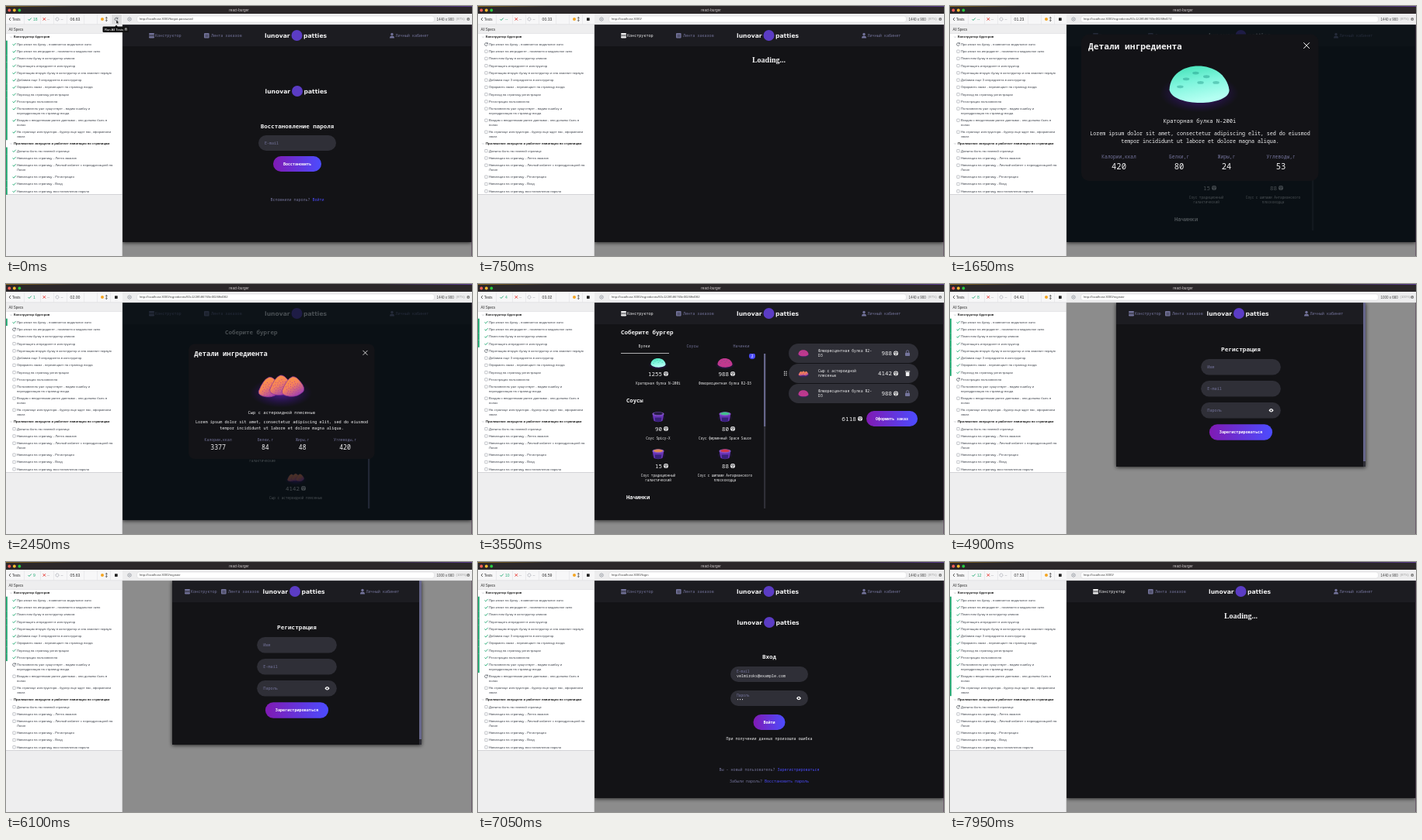
An HTML page that plays this animation: 600x323 px, repeating every 8 s.

```html
<!DOCTYPE html>
<html lang="ru">
<head>
<meta charset="utf-8">
<title>react-burger</title>
<style>
html, body { margin: 0; width: 100%; height: 100%; overflow: hidden; background: #8c8c8c; }
svg { display: block; width: 100vw; height: 100vh; }
text { white-space: pre; }
.ui { font-family: "Liberation Sans", Arial, sans-serif; }
.mono { font-family: "Noto Sans Mono", "DejaVu Sans Mono", monospace; font-weight: 500; }
.wide { font-family: "DejaVu Sans", sans-serif; font-weight: bold; }
.serif { font-family: "Liberation Serif", Times, serif; font-weight: bold; }
.b { font-weight: bold; }
.m { font-weight: 600; }
</style>
</head>
<body>
<svg viewBox="0 0 600 323">
  <defs>
    <linearGradient id="btn"><stop stop-color="#801ab3"/><stop offset="1" stop-color="#4c4cff"/></linearGradient>
    <linearGradient id="desk"><stop stop-color="#8a6a20"/><stop offset=".15" stop-color="#2b2729"/><stop offset=".8" stop-color="#2b2729"/><stop offset="1" stop-color="#5a3a90"/></linearGradient>
    <linearGradient id="aqua" x2=".3" y2="1"><stop stop-color="#3fe0b4"/><stop offset=".5" stop-color="#7df5dc"/><stop offset="1" stop-color="#b4fff2"/></linearGradient>
    <linearGradient id="cheese" x2=".7" y2="1"><stop stop-color="#ff9a3c"/><stop offset=".5" stop-color="#f5835a"/><stop offset="1" stop-color="#9a3fb8"/></linearGradient>
    <radialGradient id="glow"><stop stop-color="#6a22c8" stop-opacity=".75"/><stop offset="1" stop-color="#3a1290" stop-opacity="0"/></radialGradient>
    <clipPath id="list"><rect x="180" y="90" width="192" height="200"/></clipPath>
    <filter id="soft" x="-10%" y="-10%" width="120%" height="120%"><feGaussianBlur stdDeviation="2.5"/></filter>
  </defs>
  <g id="stage"></g>
</svg>
<script>
const LOOP = 8000, STEP = 50;
const WHITE = '#f2f2f3', MUTED = '#74749c', LINK = '#4c4cff', PILL = '#2f2f37', GREEN = '#1fa971', GREY = '#8a8f98';
const HOST = 'http://localhost:3000/', ITEM = 'ingredients/60c1228586769e0026ffd0';

const SUITES = [
  ['Конструктор бургеров', [
    'При клике на булку - появляется модальное окно',
    'При клике на ингридиент - появляется модальное окно',
    'Поместим булку в конструктор кликом',
    'Перетащить ингредиент в конструктор',
    'Перетащим вторую булку в конструктор и она заменит первую',
    'Добавим еще 3 ингредиента в конструктор',
    'Оформить заказ - перемещает на страницу входа',
    'Переход на страницу регистрации',
    'Регистрация пользователя',
    'Пользователь уже существует - видим ошибку и|переадрисация на страницу входа',
    'Входим с введенными ранее данными - они должны быть в|полях',
    'На странице конструктора - бургер еще ждет нас, оформляем|заказ']],
  ['Приложение запущено и работает навигация по страницам', [
    'Должны быть на главной странице',
    'Навигация на страницу - Лента заказов',
    'Навигация на страницу - Личный кабинет с переадресацией на|Логин',
    'Навигация на страницу - Регистрация',
    'Навигация на страницу - Вход',
    'Навигация на страницу восстановления пароля']]
];
const PASSED_AT = [1750, 2600, 2950, 3350, 3700, 4100, 4450, 4800, 6030, 6850, 7300, 7800];
const CLOCK = [[420, 0], [1650, 1230], [2450, 2000], [3550, 3020], [4900, 4410], [7050, 6590], [7950, 7530], [8000, 7580]];

const clamp = v => Math.max(0, Math.min(1, v));
const ramp = (t, a, b) => clamp((t - a) / (b - a));
const easeOut = p => 1 - (1 - p) ** 3;
const typed = (s, t, a, b) => s.slice(0, Math.round(s.length * ramp(t, a, b)));

// y is the vertical middle of the line
const text = (x, y, s, size, fill, cls = 'mono', anchor = 'start') =>
  `<text x="${x}" y="${y + size * .35}" font-size="${size}" fill="${fill}" class="${cls}" text-anchor="${anchor}">${s}</text>`;
const mid = (x, y, s, size, fill, cls) => text(x, y, s, size, fill, cls, 'middle');
const lines = (x, y, s, size, fill, gap, fn = mid, cls = 'mono') =>
  s.split('|').map((l, i) => fn(x, y + i * gap, l, size, fill, cls)).join('');
const rect = (x, y, w, h, fill, r = 0, more = '') =>
  `<rect x="${x}" y="${y}" width="${w}" height="${h}" rx="${r}" fill="${fill}" ${more}/>`;
const dot = (x, y, r, fill) => `<circle cx="${x}" cy="${y}" r="${r}" fill="${fill}"/>`;
const line = (d, color, w = .7) => `<path d="${d}" fill="none" stroke="${color}" stroke-width="${w}"/>`;
const group = (transform, body) => `<g transform="${transform}">${body}</g>`;

const check = (x, y) => line(`M${x - 2} ${y}l1.4 1.5 2.8-3`, GREEN, .9);
const spin = (x, y) => line(`M${x + 1.7} ${y - .8}a1.9 1.9 0 1 0 .1 1.6M${x + 1.9} ${y - 2.2}v1.6h-1.6`, '#444b55', .7);

const COLORS = {
  aqua: 'url(#aqua)', pink: '#c0388f', cheese: 'url(#cheese)', meat: '#c25a63',
  black: '#251a45', green: '#40c08a', orange: '#e08a50', red: '#d0364a'
};

function cup(color) {
  return '<path d="M-.5-.22L-.36 .4Q0 .55 .36 .4L.5-.22Z" fill="#6a35b8"/><path d="M-.3 .1l.05 .32Q0 .5 .25 .42L.3 .1Z" fill="#38207a"/>' +
    `<ellipse cy="-.22" rx=".5" ry=".17" fill="#8a5ad0"/><ellipse cy="-.24" rx=".4" ry=".12" fill="${color}"/>`;
}

function bun(color) {
  const marks = [[-.22, -.1], [-.06, -.2], [.12, -.14], [.28, -.04], [.02, -.04], [-.32, .03]];
  return `<path d="M-.5 .08C-.48-.44 .42-.46 .5 .08C.52 .36-.44 .38-.5 .08Z" fill="${color}"/>` +
    marks.map(([x, y]) => `<ellipse cx="${x}" cy="${y}" rx=".055" ry=".025" fill="#0a7a70" opacity=".35"/>`).join('');
}

function slices(color) {
  const slice = (x, y, i) => group(`translate(${x} ${y})`,
    `<path d="M-.2 .08Q-.1-.18 .02-.22Q.1-.24 .2-.1Q.3 .02 .25 .1Q.12 .22-.04 .2Q-.22 .18-.2 .08Z" fill="${color}" stroke="#8a2f9a" stroke-width=".012"/>` +
    Array.from({ length: 36 }, (_, k) => {
      const a = k * 2.4 + i, r = Math.sqrt(k / 36) * .17;
      return rect(.03 + Math.cos(a) * r, .03 + Math.sin(a) * r, .014, .014, '#b02fa8');
    }).join(''));
  return [[-.28, .03], [-.04, -.01], [.22, .02]].map(([x, y], i) => slice(x, y, i)).join('');
}

function food(kind, x, y, w) {
  const shape = { aqua: bun, pink: bun, cheese: slices, meat: slices }[kind] || cup;
  return group(`translate(${x} ${y}) scale(${w})`,
    '<ellipse cy=".14" rx=".66" ry=".32" fill="url(#glow)"/>' + shape(COLORS[kind]));
}

const gem = (x, y) => dot(x, y, 3, WHITE) +
  line(`M${x - 2.4} ${y - .8}h4.8M${x} ${y + 2.6}l-1.4-3.3 1.4-1.7 1.4 1.7Z`, '#1c1c21', .5);
const price = (x, y, n, size = 7.5) => text(x, y, n, size, WHITE, 'mono', 'end') + gem(x + 5, y);
const button = (y, w, label, x = 375, h = 20) =>
  rect(x - w / 2, y, w, h, 'url(#btn)', h / 2) + mid(x, y + h / 2, label, 5, '#fff', 'mono m');
const eye = (x, y) => `<path d="M${x - 3} ${y}Q${x} ${y - 4.4} ${x + 3} ${y}Q${x} ${y + 4.4} ${x - 3} ${y}Z" fill="#fff"/>` + dot(x, y, 1.1, PILL);
const field = (y, label, value = '', secret = false) => rect(325, y, 100, 20, PILL, 10) +
  (value ? text(333, y + 6.3, label, 4.6, MUTED) + text(333, y + 12.3, value, 5, WHITE) : text(333, y + 10, label, 5, MUTED)) +
  (secret ? eye(413, y + 10) : '');
const hint = (y, ask, link) => mid(375, y, `<tspan fill="${MUTED}">${ask} </tspan>${link}`, 5, LINK);

const logo = (x, y) => text(x - 9, y, 'lunovar', 7.6, WHITE, 'wide', 'end') + dot(x, y, 7, '#5b3cc4') +
  text(x + 8.5, y, 'patties', 7.6, WHITE, 'wide');

function header(x1, x2, x3, cx, active) {
  const c = active ? WHITE : MUTED;
  return rect(x1 - 6, 35, 7, 2, c, 1) + rect(x1 - 6, 37.6, 7, 1, c) + rect(x1 - 6, 39.2, 7, 2.2, c, .8) + text(x1 + 2, 38, 'Конструктор', 5.1, c) +
    rect(x2 - 6, 35, 6.6, 6.6, MUTED, 1) + line(`M${x2 - 4.6} 37h4M${x2 - 4.6} 38.4h4M${x2 - 4.6} 39.8h4`, '#1c1c21', .5) + text(x2 + 3, 38, 'Лента заказов', 5.1, MUTED) +
    logo(cx, 38) + dot(x3, 36.4, 1.7, MUTED) + `<path d="M${x3 - 3} 41.5q0-3 3-3t3 3Z" fill="${MUTED}"/>` + text(x3 + 4.5, 38, 'Личный кабинет', 5.1, MUTED);
}

const ROWS = [
  [116, ['aqua', 1255, 'Краторная булка N-200i'], ['pink', 988, 'Флюоресцентная булка R2-D3']],
  [187, ['black', 90, 'Соус Spicy-X'], ['green', 80, 'Соус фирменный Space Sauce']],
  [235, ['orange', 15, 'Соус традиционный|галактический'], ['red', 88, 'Соус с шипами Антарианского|плоскоходца']],
  [316, ['meat', 1337, 'Мясо бессмертных|моллюсков'], ['meat', 3000, 'Говяжий метеорит']],
  [358, ['meat', 424, 'Биокотлета из|марсианской магнолии'], ['meat', 874, 'Хрустящие кольца']],
  [400, ['meat', 300, 'Плоды дерева|галактические'], ['meat', 762, 'Кристаллы']],
  [454, ['cheese', 4142, 'Сыр с астероидной плесенью']]
];

function catalog(scroll, inOrder) {
  const cards = ROWS.map(([y, ...items]) => items.map(([kind, cost, name], i) => {
    const x = items.length < 2 ? 275 : i ? 318 : 232;
    const bunRow = y === 116, filling = y > 300;
    return food(kind, x, y - (bunRow || filling ? 14 : 16), bunRow ? 19 : filling ? 22 : 15) +
      price(x + 5, y, cost) + lines(x, y + 12, name, 4.35, WHITE, 6);
  }).join('')).join('');
  const badgeX = inOrder === 'pink' ? 353 : 267;
  const badge = inOrder ? dot(badgeX, 93, 4, LINK) + mid(badgeX, 93, '2', 4.5, '#fff') : '';
  return text(184, 62, 'Соберите бургер', 7.5, WHITE, 'mono m') +
    mid(214, 80, 'Булки', 5, WHITE) + mid(276, 80, 'Соусы', 5, MUTED) + mid(339, 80, 'Начинки', 5, MUTED) +
    rect(184, 89, 62, .7, WHITE) +
    `<g clip-path="url(#list)">` + group(`translate(0 ${-scroll})`, cards + badge +
      text(191, 150, 'Соусы', 7.2, WHITE, 'mono m') + text(191, 275, 'Начинки', 7.2, WHITE, 'mono m')) + '</g>' +
    rect(368, 90, 2.2, 200, PILL) + rect(368, 90 + scroll * .558, 2.2, 94, '#65658a');
}

function order(outer, fillings) {
  const [cost, name] = outer === 'pink' ? [988, 'Флюоресцентная булка R2-|D3'] : [1255, 'Краторная булка N-200i'];
  const all = [['cheese', 4142, 'Сыр с астероидной|плесенью'], ['black', 90, 'Соус Spicy-X'],
    ['green', 80, 'Соус фирменный Space|Sauce'], ['orange', 15, 'Соус традиционный|галактический']].slice(0, fillings);
  const items = [[outer, cost, name], ...all, [outer, cost, name]];
  const pills = items.map(([kind, sum, label], i) => {
    const y = 89.5 + i * 26, edge = !i || i === items.length - 1;
    const wrap = label.includes('|');
    return rect(400, y - 12.5, 167, 25, PILL, 12.5) + food(kind, 419, y, 13) +
      lines(438, y - (wrap ? 3.2 : 0), label, 4.8, WHITE, 6.4, text) + price(533, y, sum) +
      (edge ? rect(550, y - .8, 6, 4.4, MUTED, .8) + line(`M551.4 ${y - .6}v-1.6a1.6 1.6 0 0 1 3.2 0v1.6`, MUTED, .9)
        : rect(550.8, y - 1.6, 4.6, 5, WHITE, .7) + rect(550, y - 3, 6.2, 1, WHITE) +
          [0, 1, 2].map(k => dot(394.6, y - 2.2 + k * 2.2, .7, WHITE) + dot(397, y - 2.2 + k * 2.2, .7, WHITE)).join(''));
  }).join('');
  const y = 96 + items.length * 26, sum = items.reduce((s, i) => s + i[1], 0);
  return pills + price(487, y, sum, 7.8) + button(y - 10, 66, 'Оформить заказ', 533);
}

function modal(scale, kind, name, values) {
  if (scale <= 0) return '';
  const labels = [['Калории,ккал', 217.5], ['Белки,г', 295], ['Жиры,г', 356], ['Углеводы,г', 426]];
  const body = rect(169, 36.5, 305.5, 189.5, '#131317', 10) + text(178, 52, 'Детали ингредиента', 11.2, WHITE, 'mono m') +
    line('M455.3 47.3l7.6 7.6m0-7.6l-7.6 7.6', '#fff', 1) +
    food(kind, 321, kind === 'aqua' ? 102 : 106, 77) + mid(321.5, 149, name, 7.1, WHITE) +
    mid(322, 165, 'Lorem ipsum dolor sit amet, consectetur adipiscing elit, sed do eiusmod', 6.67, WHITE) +
    mid(322, 175, 'tempor incididunt ut labore et dolore magna aliqua.', 6.67, WHITE) +
    labels.map(([l, x], i) => mid(x, 195, l, 6.2, MUTED) + mid(x, 207, values[i], 10.5, WHITE)).join('');
  return rect(150, 24, 450, 281, '#081016', 0, `opacity="${.72 * clamp(scale * 2)}"`) +
    group(`translate(475 226) scale(${scale}) translate(-475 -226)`, body);
}

function builder(t) {
  const outer = t < 2850 ? '' : t < 3500 ? 'aqua' : 'pink';
  const fillings = [3200, 3800, 3900, 4000].filter(a => t >= a).length;
  const scroll = 190 * (easeOut(ramp(t, 2050, 2250)) - ramp(t, 2700, 2800) + ramp(t, 3000, 3100) - ramp(t, 3250, 3400));
  const shift = outer ? 0 : 98;
  return group(`translate(${shift} 0)`, catalog(scroll, outer)) + (outer ? order(outer, fillings) : '') +
    (t < 1750
      ? modal(easeOut(ramp(t, 1150, 1500)), 'aqua', 'Краторная булка N-200i', [420, 80, 24, 53])
      : t < 2650 ? modal(easeOut(ramp(t, 2310, 2660)), 'cheese', 'Сыр с астероидной плесенью', [3377, 84, 48, 420]) : '');
}

const MAIL = 'velmiroks@example.com';
const title = (y, s) => mid(375, y, s, 7.5, WHITE, 'mono m');
const failure = y => mid(375, y, 'При получении данных произошла ошибка', 5, WHITE);

const forgot = () => logo(375, 110) + title(155, 'Восстановление пароля') + field(167, 'E-mail') +
  button(194, 62, 'Восстановить') + hint(250, 'Вспомнили пароль?', 'Войти');

const login = t => logo(375, 78) + title(122, 'Вход') +
  field(135, 'E-mail', typed(MAIL, t, 6860, 6960)) + field(166, 'Пароль', typed('•••', t, 6960, 7010), true) +
  button(197, 41, 'Войти') + (t >= 7030 ? failure(228) : '') +
  hint(268, 'Вы - новый пользователь?', 'Зарегистрироваться') + hint(283, 'Забыли пароль?', 'Восстановить пароль');

function register(t) {
  const a = t < 6030 ? 5050 : 6150;
  return title(82.4, 'Регистрация') + field(95, 'Имя', typed('velmir', t, a, a + 120)) +
    field(122.4, 'E-mail', typed(MAIL, t, a + 120, a + 330)) + field(149.6, 'Пароль', typed('•••', t, a + 330, a + 420), true) +
    button(177, 79, 'Зарегистрироваться') + (t >= 6600 ? failure(212) : '') +
    hint(276, 'Уже зарегистрированы?', 'Войти');
}

const loading = () => mid(374.5, 69, 'Loading...', 10, WHITE, 'serif');

// [start, page, address, nav highlighted]
const SCENES = [
  [0, forgot, 'forgot-password', false], [200, loading, '', true],
  [800, builder, '', true], [1150, builder, ITEM + '74', false],
  [1750, loading, '', true], [2000, builder, '', true], [2300, builder, ITEM + '82', false],
  [2650, builder, ITEM + '82', true],
  [4150, login, 'login', false], [4500, register, 'register', false],
  [5700, login, 'login', false], [6030, register, 'register', false], [6700, login, 'login', false],
  [7150, builder, '', true], [7800, loading, '', true]
];

const isSmall = t => t >= 4820 && t < 5000 || t >= 6030 && t < 6130;

function app(t, [, page, , active]) {
  const small = isSmall(t);
  const [x, w, h] = small ? [214, 321, 212] : [150, 449.5, 281];
  const shell = rect(x, 25, w, h, '#000', 0, 'opacity=".75" filter="url(#soft)"') + rect(x, 24, w, h, '#131316') + rect(x, 24, w, 28, '#1c1c21');
  if (!small) return shell + header(190, 261, 497, 374.5, active) + page(t);
  return shell + header(236, 283, 459, 372, active) +
    `<svg x="214" y="24" width="321" height="212" viewBox="214 24 321 212">` +
    group('translate(374.5 24) scale(1.027) translate(-375 -24)', page(t)) + '</svg>' +
    rect(532, 24, 3, 212, PILL) + rect(532, 24, 3, 205, '#65658a');
}

function sidebar(done, running) {
  let y = 40, n = 0;
  let out = rect(0, 24, 150, 299, '#eeeeef') + text(3.5, 30, 'All Specs', 4.5, '#333', 'ui') + rect(0, 35.5, 150, 207.5, '#fff') +
    rect(0, 35.3, 150, .5, '#d5d5d8') + rect(0, 243, 150, .6, '#c4c4c8');
  for (const [name, tests] of SUITES) {
    out += line(`M5.4 ${y - .4}l1.1 1 1.1-1`, GREY, .5) + text(10, y, name, 4.2, '#111', 'ui b');
    y += 9.4;
    for (const test of tests) {
      const rows = test.split('|').length, h = 9.25 + (rows - 1) * 5.8;
      if (n < done) out += rect(0, y - 4.7, 1.8, h + .1, GREEN) + check(10.5, y);
      else if (n === running) out += spin(10.5, y);
      else out += rect(8.8, y - 1.7, 3.4, 3.4, 'none', .3, `stroke="${GREY}" stroke-width=".5"`);
      out += lines(14, y, test, 4.2, '#3a3f48', 5.8, text, 'ui');
      y += h;
      n++;
    }
  }
  return out + rect(149.5, 10, .6, 313, '#b5b5b8');
}

function clock(t) {
  if (t < 200) return '06.63';
  if (t < 420) return '--';
  const i = CLOCK.findIndex(k => t < k[0]), [a, u] = CLOCK[i - 1], [b, v] = CLOCK[i];
  return ((u + (v - u) * (t - a) / (b - a)) / 1000).toFixed(2).padStart(5, '0');
}

function chrome(t, done, url) {
  const small = isSmall(t), idle = t < 200;
  let out = rect(0, 0, 600, 11, '#2b2729') + rect(0, 0, 600, 1, 'url(#desk)') +
    ['#ff5f57', '#febc2e', '#28c840'].map((c, i) => dot(4.3 + i * 6.5, 5.5, 1.9, c)).join('') +
    mid(300, 5.5, 'react-burger', 4.7, '#cfc8ca', 'ui') +
    rect(0, 10, 150, 14, '#f7f7f8') + rect(150, 10, 450, 14, '#ededee') + rect(0, 23.6, 600, .5, '#cfcfd2') +
    [23, 44.5, 61, 78.5, 100, 117, 134].map(x => rect(x, 10, .5, 13.6, '#dcdce0')).join('');
  out += line('M6 15l-2 2 2 2', '#333', .8) + text(8, 17, 'Tests', 4.5, '#333', 'ui') +
    check(30.5, 17) + text(35, 17, done || '--', 5, GREEN, 'ui') +
    line('M47.6 15.2l3.4 3.4m0-3.4l-3.4 3.4', '#e8403a', 1) + text(53, 17, '--', 4.6, GREY, 'ui') +
    `<circle cx="66" cy="17" r="2" fill="none" stroke="${GREY}" stroke-width=".7" stroke-dasharray="1.4 .5"/>` + text(70.5, 17, '--', 4.6, GREY, 'ui') +
    text(82.5, 17, clock(t), 5.2, '#333', 'ui') + dot(124, 17, 2, '#f5a623') +
    line('M129.3 14.4v5.2M128.1 15.6l1.2-1.3 1.2 1.3M128.1 18.4l1.2 1.3 1.2-1.3', '#333', .7);
  out += idle ? rect(136, 11, 13, 12.4, '#dededf') + spin(142, 17) +
      '<path d="M142 18v5l1.2-1 .8 1.7 .9-.4-.8-1.7h1.6Z" fill="#111" stroke="#fff" stroke-width=".4"/>'
    : rect(140, 15.2, 3.7, 3.7, '#222', .4);
  out += line('M159 14.6l2.1 1.2v2.4l-2.1 1.2-2.1-1.2v-2.4Z', GREY, .7) + dot(159, 17, .8, GREY) +
    rect(168.5, 13, 383, 8, '#fff', 3, 'stroke="#d0d0d4" stroke-width=".5"') + text(172, 17, HOST + url, 4.2, '#444', 'ui') +
    text(554.5, 17, small ? '1000 x 660' : '1440 x 900', 4.5, '#444', 'ui') +
    text(579.5, 17, small ? '(100%)' : '(87%)', 4.2, '#999', 'ui') + dot(595.2, 17, 1.9, '#777') + rect(594.9, 16.4, .6, 1.8, '#fff');
  if (idle) out += '<path d="M140 27l2-2.4 2 2.4Z" fill="#111"/>' + rect(124.5, 26.5, 33.5, 7.4, '#111', 1.2) +
    text(127, 30.2, 'Run All Tests', 4.2, '#fff', 'ui') + rect(152.6, 28.4, 3.6, 3.6, '#555', .6) + mid(154.4, 30.2, 'R', 2.8, '#fff', 'ui');
  return out;
}

const stage = document.getElementById('stage');
let shown = -1;

function draw(t) {
  const scene = SCENES.filter(s => t >= s[0]).pop();
  const done = t < 200 ? 18 : PASSED_AT.filter(p => t >= p).length;
  stage.innerHTML = rect(0, 0, 600, 323, '#8c8c8c') + app(t, scene) +
    sidebar(done, t < 420 ? -1 : done) + chrome(t, done, scene[2]) + rect(599.5, 24, .5, 299, '#4a2a4a');
}

function tick(now) {
  const t = Math.floor(now % LOOP / STEP) * STEP;
  if (t !== shown) draw(shown = t);
  requestAnimationFrame(tick);
}
draw(0);
requestAnimationFrame(tick);
</script>
</body>
</html>
```
